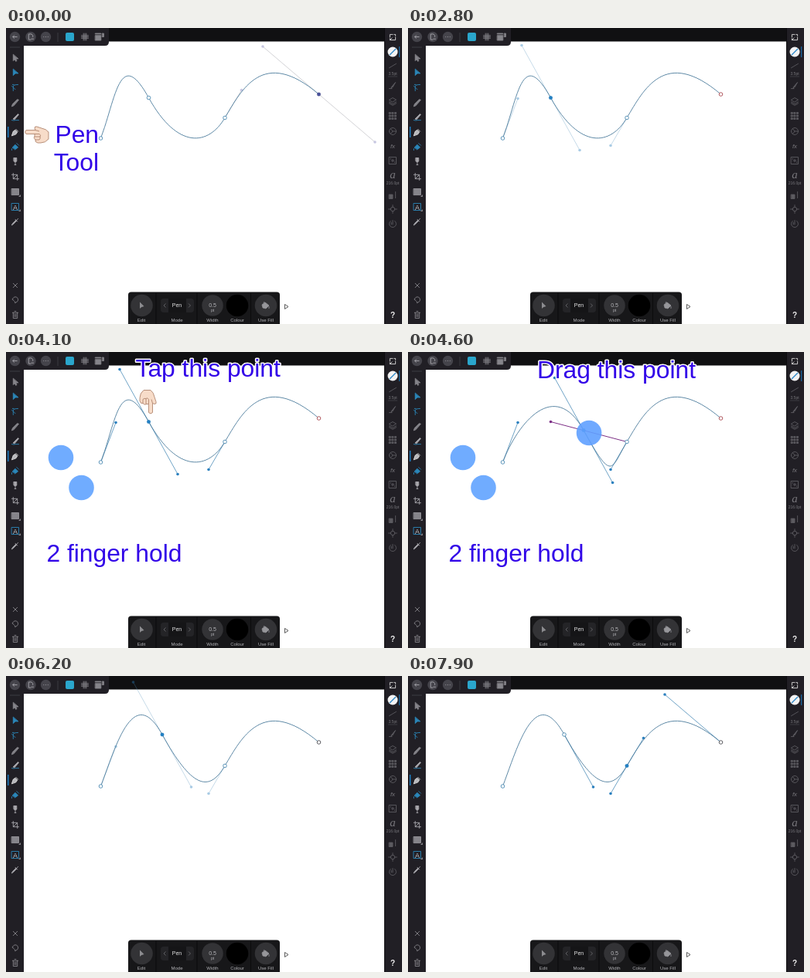
An HTML page for the animation above (8000 ms loop, 512x384 px).

```html
<!DOCTYPE html>
<html lang="en">
<head>
<meta charset="utf-8">
<title>Pen tool: moving a node</title>
<style>
html, body { margin: 0; width: 100%; height: 100%; overflow: hidden; background: #fff; }
svg { display: block; width: 512px; height: 384px; }
text { font-family: "Liberation Sans", Arial, sans-serif; }
.title { font-size: 31.8px; fill: #3205e8; stroke: #fff; stroke-width: 3px; stroke-linejoin: round; paint-order: stroke; }
.label { font-size: 6px; fill: #b4b4b8; text-anchor: middle; }
.icon { stroke-width: 1; stroke-linecap: round; stroke-linejoin: round; }
.hint, .tap, .drag, .hold { animation: 8s linear infinite both; }
.hint { animation-name: hint; }
.tap { animation-name: tap; }
.drag { animation-name: drag; }
.hold { animation-name: hold; }
@keyframes hint { 0%, 1.25% { opacity: 1; } 8.75%, 100% { opacity: 0; } }
@keyframes tap {
  0%, 43.75% { opacity: 0; } 50%, 54.99% { opacity: 1; } 55%, 100% { opacity: 0; }
}
@keyframes drag {
  0%, 54.99% { opacity: 0; } 55%, 68.75% { opacity: 1; } 76.25%, 100% { opacity: 0; }
}
@keyframes hold {
  0%, 43.75% { opacity: 0; } 50%, 68.75% { opacity: 1; } 76.25%, 100% { opacity: 0; }
}
</style>
</head>
<body>
<svg viewBox="0 0 512 384">
  <defs>
    <g id="hand" stroke="#a87a62" stroke-width=".8" stroke-linejoin="round">
      <path fill="#f7dcc9" d="M2-2.500H14L13-5Q13-8 16-7L22-5Q28-4 31 0V9Q27 14 21 14H17Q13 13 14 10Q11 8 13 5L13 2.500H2Q-1 0 2-2.500Z"/>
      <path fill="none" d="M13 2.500H19Q22 4 20 6H13M14 10H19Q21 8 20 6M14-2.500L19-1"/>
    </g>
  </defs>
  <rect width="512" height="384" fill="#fff"/>

  <g id="chrome">
    <rect width="512" height="17.500" fill="#101012"/>
    <rect width="23" height="384" fill="#211f25"/>
    <rect x="489" width="23" height="384" fill="#0c0b0e"/>
    <rect x="490" width="22" height="384" fill="#211f25"/>
    <path d="M0 0H133V18Q133 23 128 23H0Z" fill="#211f25"/>
    <g fill="#45444b">
      <circle cx="11.500" cy="11.500" r="6.700"/><circle cx="32" cy="11.500" r="6.700"/><circle cx="51.500" cy="11.500" r="6.700"/>
    </g>
    <path d="M67 6V18M5 25H18M494 63H506" stroke="#3d3c42"/>
    <rect x="77" y="6" width="11" height="11" rx="2" fill="#2aa6cc"/>
    <path d="M2 128H3.500V142H2Z" fill="#1c7fc4"/>
    <path d="M508 24H509.200V38H508Z" fill="#1a6aa4"/>
    <circle cx="500" cy="31" r="6.500" fill="#f4f4f4"/>
    <path d="M496 35L504 27" stroke="#2a86c8" stroke-width="1.200"/>
    <g id="icons"></g>
    <g fill="#77767b" text-anchor="middle">
      <text x="500" y="61" font-size="5">3.5pt</text>
      <text x="500" y="203" font-size="5">216.0pt</text>
      <text x="500" y="156" font-size="8" font-style="italic">fx</text>
      <text x="500" y="195" font-size="15" font-style="italic" style="font-family:'Liberation Serif',serif">a</text>
    </g>
    <text x="500" y="376" font-size="10" font-weight="bold" fill="#eee" text-anchor="middle">?</text>
    <text x="12" y="235.500" font-size="9" fill="#c4c4c8" text-anchor="middle">A</text>

    <path d="M158 384V346Q158 342.500 162 342.500H350Q354 342.500 354 346V384Z" fill="#171719"/>
    <path d="M194 344V384M247 344V384M316.500 344V384" stroke="#0b0b0c"/>
    <g fill="#333336">
      <circle cx="175.500" cy="360" r="14.300"/><circle cx="267" cy="360" r="13.800"/><circle cx="336" cy="360" r="14.300"/>
    </g>
    <rect x="200" y="351" width="43" height="18" rx="4" fill="#242427"/>
    <rect x="210" y="351" width="23" height="18" fill="#151517"/>
    <circle cx="299" cy="360" r="14.300" fill="#000"/>
    <path d="M173 355.500V364L175 362.300L178.500 361Z" fill="#8c8c90"/>
    <path d="M206.500 357.500L204 360L206.500 362.500M236 357.500L238.500 360L236 362.500" fill="none" stroke="#5f5f63"/>
    <path d="M331 359L335 356L340 360L336 364L332 363ZM333 357L334 355M340 361V364" fill="#96969a" stroke="#96969a" stroke-width=".8"/>
    <text class="label" x="221" y="362" style="font-size:7px;fill:#e4e4e6">Pen</text>
    <text class="label" x="267" y="361.500" style="font-size:7px">0.5</text>
    <text class="label" x="267" y="367.500" style="font-size:5px">pt</text>
    <g id="labels"></g>
    <path d="M360.500 358.500V364.500L365 361.500Z" fill="#fff" stroke="#333" stroke-width=".8"/>
  </g>

  <path id="guide" fill="none" stroke="#7d2f86"/>
  <g id="handles"></g>
  <path id="curve" fill="none" stroke="#4c7c9c" stroke-width=".9"/>
  <g id="nodes"></g>

  <g class="hint">
    <use href="#hand" x="24" y="135"/>
    <g class="title" text-anchor="end">
      <text x="120" y="148.500">Pen</text><text x="120" y="184.500">Tool</text>
    </g>
  </g>
  <g class="hold">
    <g fill="#70acff"><circle cx="71" cy="137" r="16.300"/><circle cx="97.500" cy="176" r="16.300"/></g>
    <text class="title" x="52.400" y="272">2 finger hold</text>
  </g>
  <g class="tap">
    <use href="#hand" transform="translate(187 80.500) scale(-1 1) rotate(-90)"/>
    <text class="title" x="167.500" y="32">Tap this point</text>
  </g>
  <text class="title drag" x="167" y="34">Drag this point</text>
  <circle id="touch" r="16.300" fill="#60a0ff" fill-opacity=".9"/>
</svg>

<script>
const LOOP = 8000;
const $ = id => document.getElementById(id);

function add(parent, tag, attrs) {
  const el = document.createElementNS("http://www.w3.org/2000/svg", tag);
  for (const k in attrs) el.setAttribute(k, attrs[k]);
  return parent.appendChild(el);
}

// Icons are drawn around their own centre: x, y, stroke, fill, path.
const DIM = "#5c5b60", GREY = "#85848a", PALE = "#a9a8ad", BLUE = "#2b86b8", NONE = "none";
const icons = [
  [11.5, 11.5, PALE, NONE, "M3 0H-3L-1-2M-3 0L-1 2"],
  [32, 11.5, PALE, NONE, "M0 4H-3V-4H1L3-2V0M1 3H4"],
  [51.5, 11.5, PALE, NONE, "M-3 0H-2.9M0 0H.1M3 0H3.1"],
  [102, 11.5, GREY, NONE, "M-5-2H5M-5 2H5M-2-5V5M2-5V5M-5 0H5M0-5V5"],
  [121, 11.5, GREY, GREY, "M-6-2H2V5H-6ZM-6-5H2V-4H-6ZM4-5H6V0H4Z"],
  [12, 39, GREY, GREY, "M-3-5V4L-1 2L1 5L2 4L1 1H4Z"],
  [12, 58, BLUE, BLUE, "M-3-5V4L0 1H4Z"],
  [12, 77, BLUE, NONE, "M-3 5V-1Q-3-4 4-4M-5-2L0 3M-4-4H-2"],
  [12, 97, GREY, GREY, "M-5 5L-4 2L3-5L5-4L-2 4Z"],
  [12, 116, BLUE, NONE, "M-5 4Q-2 5 0 4H5"],
  [12, 116, PALE, PALE, "M-3 2L4-5L5-4L-1 3Z"],
  [12, 135, "#ddd", "#b8b8bc", "M-5 5L-3-1L0-3L3 0L1 3ZM1-4L4-1"],
  [12, 154, BLUE, BLUE, "M-4 1L0-3L4 1L0 4ZM2-5L5-2M-5 3V5"],
  [12, 173, PALE, PALE, "M-2-5H2V0Q0 2-2 0ZM0 1V5M-1 5H1"],
  [12, 193, PALE, NONE, "M-5-3H3V5M-3-5V3H5M-3 3L3-3"],
  [12, 213, "#96959a", "#85848a", "M-5-5H5V4H-5Z"],
  [12, 232, BLUE, NONE, "M-5-5H5V5H-5Z"],
  [12, 251, PALE, PALE, "M-5 5L-4 3L1-2L2-1L-3 4ZM0-3L3 0M2-2L4-4"],
  [12, 334, GREY, NONE, "M-3-3L3 3M3-3L-3 3"],
  [12, 353, GREY, NONE, "M-4-1A4 4 0 1 1 3 2L0 4M-4-1L-2 1M0 4L-1 2"],
  [12, 372, GREY, NONE, "M-4-3H4M-3-3V5H3V-3M-1-5H1M-1-1V3M1-1V3"],
  [500, 12, "#ddd", NONE, "M-4 0V-4H0M4 0V4H-4V2M2-4H4V-2M-4 4L-1 1"],
  [500, 49, DIM, NONE, "M-5 3L5-3"],
  [500, 75, DIM, DIM, "M-5 4H-1L-2 2L4-5L0 2"],
  [500, 95, DIM, NONE, "M-5-2L0-5L5-2L0 1ZM-5 1L0 4L5 1M-5 3L0 6L5 3"],
  [500, 114, DIM, DIM, "M-5-5H-3V-3H-5ZM-1-5H1V-3H-1ZM3-5H5V-3H3ZM-5-1H-3V1H-5ZM-1-1H1V1H-1ZM3-1H5V1H3ZM-5 3H-3V5H-5ZM-1 3H1V5H-1ZM3 3H5V5H3Z"],
  [500, 134, DIM, NONE, "M-5 0A5 5 0 1 0 5 0A5 5 0 1 0-5 0M-3-4L0 0L5 0M0 0L-3 4"],
  [500, 172, DIM, NONE, "M-5-5H5V5H-5ZM-2 0H2M0-2V2M-3-3V-2M3 2V3"],
  [500, 217, DIM, DIM, "M-5-1H0V5H-5ZM4-5V4"],
  [500, 235, DIM, NONE, "M-3 0A3 3 0 1 0 3 0A3 3 0 1 0-3 0M0-6V-3M0 3V6M-6 0H-3M3 0H6"],
  [500, 254, DIM, NONE, "M-3-4A5 5 0 1 0 3-4M0-5V1M-2-2V1"]
];
for (const [x, y, stroke, fill, d] of icons)
  add($("icons"), "path", { class: "icon", transform: `translate(${x} ${y}) scale(.9)`, stroke, fill, d });
for (const y of [219, 238]) add($("icons"), "path", { d: `M19 ${y}V${y - 3}L16 ${y}Z`, fill: GREY });

for (const [x, name] of [[175, "Edit"], [221, "Mode"], [267, "Width"], [299, "Colour"], [336, "Use Fill"]])
  add($("labels"), "text", { class: "label", x, y: 381 }).textContent = name;

// Interpolates rows of [time, ...values].
function track(rows, t) {
  let i = 0;
  while (i < rows.length - 1 && t >= rows[i + 1][0]) i++;
  const a = rows[i], b = rows[i + 1] || a;
  const k = b === a ? 0 : Math.max(0, (t - a[0]) / (b[0] - a[0]));
  return a.slice(1).map((v, j) => v + (b[j + 1] - v) * k);
}

// The node slides along the line to its next neighbour, then along the line from the previous one.
const nodePath = [
  [4400, 184.5, 90.5], [4600, 227, 101.5], [4750, 236, 104], [4950, 205, 96],
  [5000, 190, 86], [5200, 202, 76]
];
const touchPath = [
  [4400, 188, 92], [4600, 234, 105], [4750, 242, 108], [4950, 214, 95], [5200, 216, 78]
];
const touchFade = [[4350, 0], [4450, 1], [5400, 1], [5700, 0]];
const handleFade = [
  [0, .4], [1000, .4], [2100, .8], [2799, .8], [2800, .4], [3200, 1],
  [5800, 1], [6100, .4], [6500, .4], [6900, 1], [7799, 1], [7800, .6], [7900, 1]
];

const handles = Array.from({ length: 4 }, () => ({
  line: add($("handles"), "path", { "stroke-width": .8 }),
  dot: add($("handles"), "circle", { r: 1.8 })
}));
const dots = Array.from({ length: 4 }, () => add($("nodes"), "circle", { r: 2.3 }));
const origin = add($("nodes"), "circle", { cx: 184.5, cy: 90.5, r: 1.8, fill: "#7d2f86" });

function place(dot, [x, y]) {
  dot.setAttribute("cx", x);
  dot.setAttribute("cy", y);
}

function draw(t) {
  const [x, y] = track(nodePath, t);
  const n = [
    { at: [122.5, 143], out: [142, 91.5] },
    { at: [x, y], in: [x - 37.5, y - 68], out: [x + 37.5, y + 68] },
    { at: [283, 116.5], in: [262, 152.5], out: [304.5, 80.5] },
    { at: [404.5, 86], in: [332, 24], out: [477, 148] }
  ];
  $("curve").setAttribute("d", "M" + n[0].at +
    n.slice(1).map((p, i) => `C${n[i].out} ${p.in} ${p.at}`).join(""));

  const picked = t < 2800 ? 3 : t < 7800 ? 1 : 2;
  const shown = [[picked - 1, "out"], [picked, "in"], [picked, "out"], [picked + 1, "in"]];
  const last = picked === 3;
  handles.forEach(({ line, dot }, i) => {
    const [k, side] = shown[i], p = n[k];
    line.style.display = dot.style.display = p ? "" : "none";
    if (!p) return;
    line.setAttribute("d", `M${p.at}L${p[side]}`);
    line.setAttribute("stroke", last ? "#75757f" : "#4b8cb8");
    dot.setAttribute("fill", last ? "#7373b5" : "#2b80bf");
    place(dot, p[side]);
  });
  $("handles").setAttribute("opacity", track(handleFade, t)[0]);

  dots.forEach((dot, i) => {
    const on = i === picked;
    const edge = i < 3 ? "#4a8ab2" : t < 5200 ? "#a8474d" : "#4a4a50";
    place(dot, n[i].at);
    dot.setAttribute("fill", !on ? "#fff" : last ? "#4a529c" : "#2180c4");
    dot.setAttribute("stroke", !on ? edge : last ? "#343c70" : "#2878b0");
    dot.setAttribute("stroke-width", on ? .3 : .9);
  });

  const dragging = t >= 4450 && t < 5500;
  $("guide").style.display = origin.style.display = dragging ? "" : "none";
  $("guide").setAttribute("d", t < 4950 ? "M184.5 90.5L283 116.5" : `M122.5 143L184.5 90.5L${x} ${y}`);

  place($("touch"), track(touchPath, t));
  $("touch").setAttribute("opacity", track(touchFade, t)[0]);
}

const start = performance.now();
function tick() {
  draw((performance.now() - start) % LOOP);
  requestAnimationFrame(tick);
}
tick();
</script>
</body>
</html>
```
